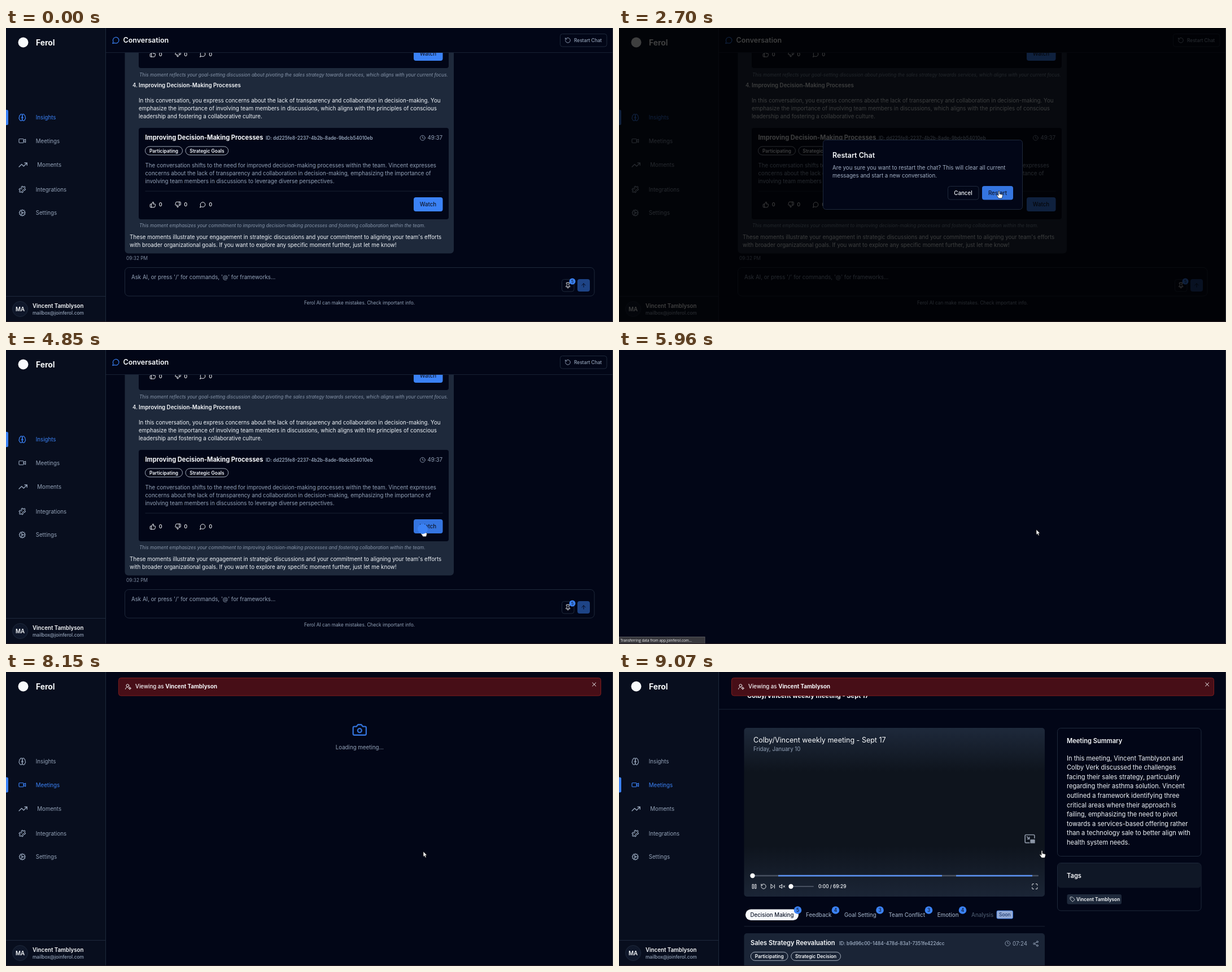
An HTML page for the animation above (9.1 s loop, 1075 by 521 pixels).

```html
<!DOCTYPE html>
<html lang="en">
<head>
<meta charset="utf-8">
<title>Conversation</title>
<style>
html, body { margin: 0; width: 100%; height: 100%; overflow: hidden; background: #020617; }
svg { display: block; width: 100vw; height: 100vh; font-family: Inter, Roboto, sans-serif; }
text { white-space: pre; }
</style>
</head>
<body>
<svg id="stage" viewBox="0 0 1075 521"></svg>
<script>
const BG = '#020617', LINE = '#1e293b', MUTED = '#94a3b8', WHITE = '#f8fafc', BLUE = '#3b82f6', BLUE_HOVER = '#3575e0', INK = '#0f172a';
const XS = 8.3, SM = 9.72, MD = 11.1, LG = 12.5;
const APP = 'Ferol', USER = 'Vincent Tamblyson', MAIL = 'mailbox@joinferol.com';
const MEETING = 'Colby/Vincent weekly meeting - Sept 17';

const circle = (x, y, r) => `<circle cx="${x}" cy="${y}" r="${r}"/>`;
const path = d => `<path d="${d}"/>`;
const ICONS = {
  chat: path('M7.9 20A9 9 0 1 0 4 16.1L2 22Z'),
  restart: path('M3 12a9 9 0 1 0 9-9 9.75 9.75 0 0 0-6.74 2.74L3 8M3 3v5h5'),
  brain: path('M12 5a3 3 0 1 0-5.997.125 4 4 0 0 0-2.526 5.77 4 4 0 0 0 .556 6.588A4 4 0 1 0 12 18Z') +
    path('M12 5a3 3 0 1 1 5.997.125 4 4 0 0 1 2.526 5.77 4 4 0 0 1-.556 6.588A4 4 0 1 1 12 18Z') +
    path('M15 13a4.5 4.5 0 0 1-3-4 4.5 4.5 0 0 1-3 4'),
  video: '<rect x="2" y="6" width="14" height="12" rx="2"/>' + path('M16 13.5l6 3.3V7.2l-6 3.3'),
  trend: path('M22 7 13.5 15.5 8.5 10.5 2 17M16 7h6v6'),
  puzzle: '<path transform="rotate(45 12 12)" d="M5 5h5a2.6 2.6 0 1 1 4 0h5v5a2.6 2.6 0 1 0 0 4v5h-5a2.6 2.6 0 1 1-4 0H5v-5a2.6 2.6 0 1 0 0-4Z"/>',
  cog: circle(12, 12, 8) + circle(12, 12, 2) +
    path('M12 2v2M12 22v-2M17 20.66l-1-1.73M11 10.27 7 3.34M20.66 17l-1.73-1M3.34 7l1.73 1M14 12h8M2 12h2M20.66 7l-1.73 1M3.34 17l1.73-1M17 3.34l-1 1.73M11 13.73l-4 6.93'),
  up: path('M7 10v12M15 5.88 14 10h5.83a2 2 0 0 1 1.92 2.56l-2.33 8A2 2 0 0 1 17.5 22H4a2 2 0 0 1-2-2v-8a2 2 0 0 1 2-2h2.76a2 2 0 0 0 1.79-1.11L12 2a3.13 3.13 0 0 1 3 3.88Z'),
  clock: circle(12, 12, 10) + path('M12 6v6l4 2'),
  pin: path('M12 17v5M9 10.76a2 2 0 0 1-1.11 1.79l-1.78.9A2 2 0 0 0 5 15.24V16a1 1 0 0 0 1 1h12a1 1 0 0 0 1-1v-.76a2 2 0 0 0-1.11-1.79l-1.78-.9A2 2 0 0 1 15 10.76V7a1 1 0 0 1 1-1 2 2 0 0 0 0-4H8a2 2 0 0 0 0 4 1 1 0 0 1 1 1z'),
  arrow: path('M5 12l7-7 7 7M12 19V5'),
  camera: path('M14.5 4h-5L7 7H4a2 2 0 0 0-2 2v9a2 2 0 0 0 2 2h16a2 2 0 0 0 2-2V9a2 2 0 0 0-2-2h-3l-2.5-3z') + circle(12, 13, 3),
  user: circle(10, 8, 5) + circle(18, 18, 3) + path('M2 21a8 8 0 0 1 10.4-7.6M18 13.5v1.5M18 21v1.5M13.5 18H15M21 18h1.5'),
  close: path('M18 6 6 18M6 6l12 12'),
  skip: path('M5 4l10 8-10 8V4zM19 5v14'),
  pause: path('M5 4h4v16H5zM15 4h4v16h-4z'),
  mute: path('M11 5 6 9H2v6h4l5 4V5zM22 9l-6 6M16 9l6 6'),
  full: path('M8 3H5a2 2 0 0 0-2 2v3M21 8V5a2 2 0 0 0-2-2h-3M3 16v3a2 2 0 0 0 2 2h3M16 21h3a2 2 0 0 0 2-2v-3'),
  share: circle(18, 5, 3) + circle(6, 12, 3) + circle(18, 19, 3) + path('M8.6 13.5l6.8 4M15.4 6.5l-6.8 4'),
  tag: path('M12.6 2.6A2 2 0 0 0 11.2 2H4a2 2 0 0 0-2 2v7.2a2 2 0 0 0 .6 1.4l8.7 8.7a2.4 2.4 0 0 0 3.4 0l6.6-6.6a2.4 2.4 0 0 0 0-3.4zM7.5 7.5h.01'),
  pip: path('M22 10V5a2 2 0 0 0-2-2H4a2 2 0 0 0-2 2v13a2 2 0 0 0 2 2h7M6 7l5 5M11 8v4H7') +
    '<rect x="14" y="14" width="8" height="6" fill="currentColor"/>'
};

const text = (x, y, size, fill, str, weight = 400, extra = '') =>
  `<text x="${x}" y="${y}" font-size="${size}" fill="${fill}" font-weight="${weight}" ${extra}>${str}</text>`;
const mid = (x, y, size, fill, str, weight) => text(x, y, size, fill, str, weight, 'text-anchor="middle"');
const lines = (x, y, step, size, fill, list) => list.map((s, i) => text(x, y + i * step, size, fill, s)).join('');
// Box given by its left, top, right and bottom edges.
const box = (l, t, r, b, fill, rx = 0, stroke = 'none', extra = '') =>
  `<rect x="${l}" y="${t}" width="${r - l}" height="${b - t}" rx="${rx}" fill="${fill}" stroke="${stroke}" ${extra}/>`;
const dot = (x, y, r, fill) => `<circle cx="${x}" cy="${y}" r="${r}" fill="${fill}"/>`;
const icon = (name, cx, cy, size, color, turn = 0, width = 2) =>
  `<g transform="translate(${cx} ${cy}) rotate(${turn}) scale(${size / 24}) translate(-12 -12)" fill="none" stroke="${color}" color="${color}" stroke-width="${width}" stroke-linecap="round" stroke-linejoin="round">${ICONS[name]}</g>`;
const group = (id, body) => `<g id="${id}">${body}</g>`;
const pill = (l, r, y, str) =>
  box(l, y, r, y + 15, 'none', 7.5, '#cbd5e1', 'stroke-width=".8"') + mid((l + r) / 2, y + 10.6, XS, WHITE, str, 600);

function sidebar(active) {
  const nav = [['Insights', 'brain', 158.5], ['Meetings', 'video', 200], ['Moments', 'trend', 242.5], ['Integrations', 'puzzle', 286], ['Settings', 'cog', 327.5]];
  return box(0, 0, 177, 520, '#080e1e') + box(176, 0, 177, 520, LINE) + box(0, 475, 176, 476, LINE) +
    dot(30.5, 25.5, 9, WHITE) + text(53, 30.5, 13.9, WHITE, APP, 700) +
    nav.map(([label, name, y]) => {
      const on = label === active, wide = name === 'trend', color = on ? BLUE : MUTED;
      return (on ? box(-3, y - 13.5, 4, y + 13.5, BLUE, 2.5) : '') +
        icon(name, wide ? 30.2 : 28.8, y, wide ? 17 : 14, color) +
        text(wide ? 55.3 : 52.7, y + 3.6, SM, color, label);
    }).join('') +
    `<circle cx="25" cy="498" r="13.5" fill="${INK}" stroke="${LINE}"/>` + mid(25, 501.5, SM, WHITE, 'MA', 600) +
    text(47, 495.6, SM, WHITE, USER, 600) + text(47, 508, XS, MUTED, MAIL, 500);
}

const reactions = y => [['up', 260, 0], ['up', 304.5, 180], ['chat', 348.5, 0]].map(([name, x, turn]) =>
  icon(name, x, y, 11.5, WHITE, turn) + text(x + 10.7, y + 3.4, 9.2, WHITE, '0', 500)).join('');
const watch = (y, id) => `<g id="${id}">${box(722, y, 773.5, y + 25, BLUE, 4)}</g>` + mid(747.5, y + 16, SM, INK, 'Watch', 500);
const note = (y, str) => text(236, y, XS, MUTED, str, 400, 'font-style="italic" opacity=".9"');

const chat = box(177, 0, 1075, 521, BG) +
  box(210.5, 30, 793, 399.5, LINE, 6) + box(235, 20, 784, 71, BG, 4) +
  reactions(46.3) + watch(33, 'watchTop') +
  note(86, 'This moment reflects your goal-setting discussion about pivoting the sales strategy towards services, which aligns with your current focus.') +
  text(224, 104.5, SM, WHITE, '4.', 500) + text(235, 104.5, SM, WHITE, 'Improving Decision-Making Processes', 600) +
  lines(235, 132, 13.9, SM, '#f1f5f9', [
    'In this conversation, you express concerns about the lack of transparency and collaboration in decision-making. You',
    'emphasize the importance of involving team members in discussions, which aligns with the principles of conscious',
    'leadership and fostering a collaborative culture.']) +
  box(235, 177, 784, 339, BG, 4) +
  text(246.5, 198, MD, WHITE, 'Improving Decision-Making Processes', 700) +
  text(460, 197.7, XS, MUTED, 'ID: dd225fe8-2237-4b2b-8ade-9bdcb54010eb', 600) +
  icon('clock', 737.8, 194.8, 10.5, MUTED) + text(746.5, 198.4, SM, MUTED, '49:37') +
  pill(246.5, 312.5, 210, 'Participating') + pill(318, 393.7, 210, 'Strategic Goals') +
  lines(246.5, 247, 13.9, SM, MUTED, [
    'The conversation shifts to the need for improved decision-making processes within the team. Vincent expresses',
    'concerns about the lack of transparency and collaboration in decision-making, emphasizing the importance of',
    'involving team members in discussions to leverage diverse perspectives.']) +
  box(246.5, 288.7, 773.5, 289.5, LINE) + reactions(313) + watch(300, 'watchBtn') +
  note(353, 'This moment emphasizes your commitment to improving decision-making processes and fostering collaboration within the team.') +
  lines(219, 374.3, 13.9, SM, '#f1f5f9', [
    "These moments illustrate your engagement in strategic discussions and your commitment to aligning your team's efforts",
    'with broader organizational goals. If you want to explore any specific moment further, just let me know!']) +
  text(213, 411, XS, MUTED, '09:32 PM', 400, 'opacity=".85"') +
  box(210.5, 424.5, 1042, 475, BG, 7, LINE) +
  text(222, 445, SM, MUTED, "Ask AI, or press '/' for commands, '@' for frameworks...") +
  box(984.5, 445.5, 1006, 467, BG, 4, LINE) + icon('pin', 995.2, 456.3, 12, WHITE) +
  dot(1003, 449, 5.5, BLUE) + mid(1003, 451.6, 7, INK, '5', 500) +
  box(1012, 445, 1034, 467, '#1e4486', 4) + icon('arrow', 1023, 456, 11, BG) +
  mid(626, 490, XS, MUTED, APP + ' AI can make mistakes. Check important info.') +
  box(177, 0, 1075, 44, BG) + box(177, 43.2, 1075, 44, LINE) +
  icon('chat', 194.7, 21.7, 14, BLUE) + text(207.5, 26.2, LG, WHITE, 'Conversation', 600) +
  box(981.5, 10.5, 1064, 33, BG, 4, LINE) + icon('restart', 995, 21.8, 11.5, MUTED) +
  `<g id="restartText" fill="${MUTED}"><text x="1006" y="24.8" font-size="${XS}" font-weight="500">Restart Chat</text></g>` +
  sidebar('Insights');

const dialog = box(361.5, 198.5, 714.5, 321.5, BG, 5, LINE) +
  text(378, 230, LG, WHITE, 'Restart Chat', 600) +
  lines(378, 251, 14, SM, '#a3b0c4', [
    'Are you sure you want to restart the chat? This will clear all current',
    'messages and start a new conversation.']) +
  group('cancelBtn', box(582.5, 280.5, 637, 304, BG, 4, LINE)) + mid(609.5, 295.6, SM, WHITE, 'Cancel', 500) +
  group('okBtn', box(643, 280, 698, 304.5, BLUE, 4)) + mid(670.5, 295.6, SM, INK, 'Restart', 500);

const loading = group('camera', icon('camera', 626.3, 102.5, 27.8, BLUE)) + mid(626.3, 137.2, SM, MUTED, 'Loading meeting...');

const badge = (x, n) => dot(x, 422, 6.8, BLUE) + mid(x, 425, 8.3, INK, n, 500);
const tabs = [[331, 'Feedback'], [399, 'Goal Setting'], [477.5, 'Team Conflict'], [563.7, 'Emotion']];
const counts = [[316.5, 5], [383.5, 4], [462, 3], [548.5, 3], [608.5, 4]];

const meeting = box(177, 0, 1075, 521, BG) + text(227, 45.6, MD, WHITE, MEETING, 700) + box(177, 65.7, 1075, 66.5, LINE) +
  box(221.5, 99, 754, 398, 'url(#shade)', 5) +
  text(238, 124.5, LG, WHITE, MEETING) + text(238, 140, SM, MUTED, 'Friday, January 10') +
  icon('pip', 727.5, 296, 20, '#8b95a5') +
  box(236, 359.8, 743, 362.3, '#475060', 1) + box(282, 359.8, 572, 362.3, '#5b93f5') + box(597, 359.8, 732, 362.3, '#5b93f5') +
  dot(236.5, 361, 4.2, '#fff') +
  icon('pause', 239.7, 380, 11, WHITE) + icon('restart', 256, 380, 11, WHITE) + icon('skip', 272.3, 380, 11, WHITE) + icon('mute', 289, 380, 11.5, WHITE) +
  box(304, 379, 345, 381, '#475060', 1) + dot(304.5, 380, 4.2, '#fff') +
  text(353, 383, XS, WHITE, '0:00 / 69:29', 500) + icon('full', 736.3, 380, 12, WHITE) +
  box(224, 420.5, 318, 440, WHITE, 9.7) + mid(271, 433.7, SM, INK, 'Decision Making', 500) +
  tabs.map(([x, s]) => text(x, 433.7, SM, MUTED, s, 500)).join('') + counts.map(([x, n]) => badge(x, n)).join('') +
  text(624, 433.7, SM, '#475569', 'Analysis', 500) +
  box(669, 423, 697.5, 437, '#94aad4', 2, BLUE, 'stroke-width=".8"') + mid(683.3, 433, XS, '#1e3a70', 'Soon', 500) +
  box(221.5, 450.4, 754, 451.2, LINE) +
  box(221.5, 463, 754, 530, '#1a2436', 5) +
  text(233, 483.7, MD, WHITE, 'Sales Strategy Reevaluation', 600) +
  text(390, 483.5, XS, MUTED, 'ID: b9d96c00-1484-478d-83a1-7351fe422dcc', 600) +
  icon('clock', 688.3, 481, 10.5, MUTED) + text(697, 484.6, SM, MUTED, '07:24') + icon('share', 738, 481.5, 11.5, MUTED) +
  pill(233.3, 299, 496.3, 'Participating') + pill(304.8, 392.5, 496.3, 'Strategic Decision') +
  box(776.5, 99.5, 1031, 326.5, BG, 6, LINE) + text(793, 126, MD, WHITE, 'Meeting Summary', 600) +
  lines(793, 156.5, 16.6, MD, '#f1f5f9', [
    'In this meeting, ' + USER + ' and', 'Colby Verk discussed the challenges', 'facing their sales strategy, particularly',
    'regarding their asthma solution. Vincent', 'outlined a framework identifying three', 'critical areas where their approach is',
    'failing, emphasizing the need to pivot', 'towards a services-based offering rather', 'than a technology sale to better align with',
    'health system needs.']) +
  box(776.5, 338.5, 1031, 423, BG, 6, LINE) + box(777, 339, 1030.5, 382.5, '#0f1726', 5) +
  text(793, 365, MD, WHITE, 'Tags', 600) +
  box(793.5, 394, 890, 411.5, LINE, 3) + icon('tag', 803, 402.8, 9.5, WHITE) + text(810, 406, XS, WHITE, USER, 600);

const banner = box(199.5, 10.5, 1053.5, 42, '#470e17', 4, '#7f1d1d') + icon('user', 216.3, 26, 11.5, WHITE) +
  icon('close', 1041.6, 22, 12, WHITE) +
  group('bannerText', text(229, 29.2, SM, WHITE, `Viewing as <tspan font-weight="700">${USER}</tspan>`, 500));

const status = box(-1, 508.5, 152, 521, '#38383d', 0, '#56565c') +
  text(2.5, 516.8, 6.4, '#f4f4f6', 'Transferring data from app.joinferol.com...', 400, 'font-family="Open Sans, Noto Sans, sans-serif"');

const outline = 'fill="#fff" stroke="#111" stroke-width=".7" stroke-linejoin="round"';
const stage = document.getElementById('stage');
stage.innerHTML =
  `<defs><linearGradient id="shade" x2="0" y2="1"><stop stop-color="#1e293b"/><stop offset=".26" stop-color="#0e141d"/><stop offset=".7" stop-color="#0e141d"/><stop offset="1" stop-color="#1b2536"/></linearGradient></defs>` +
  box(0, 0, 1075, 521, BG) + group('chat', chat) +
  group('veil', box(0, 0, 1075, 521, '#000')) + group('dialog', dialog) +
  group('blank', box(0, 0, 1075, 521, '#1c1b22')) +
  group('loading', loading) + group('meeting', meeting) + group('side', sidebar('Meetings')) +
  group('banner', banner) + group('status', status) +
  box(1074, 0, 1075, 521, '#34353d') + box(0, 520, 1075, 521, '#2c1f24') +
  group('cursor', `<path id="arrow" ${outline} d="M0 0V9.4L2.1 7.5 3.6 11 5.3 10.3 3.8 6.9H6.6Z"/>` +
    `<path id="hand" ${outline} d="M-1 1c0-1.4 2-1.4 2 0v4l4.2 1c.8.2 1.3.8 1.2 1.6L5.9 10.5 5 12.8H-.6C-1.5 11-3.5 9-4 7.6c-.2-1 1-1.3 1.8-.5L-1 8.2z"/>`) +
  `<circle id="click" r="9" fill="${BLUE}"/>`;

const $ = {};
stage.querySelectorAll('[id]').forEach(e => $[e.id] = e);

const LOOP = 9100;
// start, end, from, bend, to
const MOVES = [
  [100, 740, 1078, 230, 1050, 60, 990, 18],
  [1300, 2700, 990, 18, 958, 114, 673, 289],
  [3080, 3420, 673, 289, 645, 296, 610, 296],
  [4110, 4680, 610, 296, 670, 300, 739, 318],
  [8990, 9065, 739, 318, 744, 318, 749, 316.5]
];
const HAND = [[650, 1420], [2520, 4130], [4520, 4960], [8990, LOOP]];
const CLICKS = [[1120, 990, 20], [3540, 608, 295], [4850, 738, 317]];

const clamp = v => Math.max(0, Math.min(1, v));
const smooth = v => v * v * (3 - 2 * v);
const ramp = (t, a, b) => smooth(clamp((t - a) / (b - a)));
const within = (t, a, b) => t >= a && t < b;
const show = (id, on) => $[id].style.display = on ? '' : 'none';
const fill = (id, color) => $[id].firstChild.setAttribute('fill', color);

function pointer(t) {
  let m = MOVES[0];
  for (const next of MOVES) if (t >= next[0]) m = next;
  const [a, b, x0, y0, cx, cy, x1, y1] = m, s = ramp(t, a, b), r = 1 - s;
  return [r * r * x0 + 2 * r * s * cx + s * s * x1, r * r * y0 + 2 * r * s * cy + s * s * y1];
}

function render(t) {
  show('chat', t < 4960);
  show('blank', within(t, 4960, 5910));
  show('status', within(t, 5940, 6860));
  show('side', t >= 6500);
  show('loading', within(t, 6500, 8300));
  show('meeting', t >= 8300);

  const open = t < 2700 ? ramp(t, 1140, 1340) : 1 - ramp(t, 3570, 3770), k = .95 + .05 * open;
  show('veil', open > 0);
  show('dialog', open > 0);
  $.veil.setAttribute('opacity', .75 * open);
  $.dialog.setAttribute('opacity', open);
  $.dialog.setAttribute('transform', `translate(538 260) scale(${k}) translate(-538 -260)`);

  $.restartText.setAttribute('fill', within(t, 650, 1400) ? WHITE : MUTED);
  fill('okBtn', within(t, 2520, 3250) ? BLUE_HOVER : BLUE);
  fill('cancelBtn', within(t, 3260, 3800) ? LINE : BG);
  fill('watchBtn', within(t, 4520, 4960) ? BLUE_HOVER : BLUE);

  const p = ((within(t, 7860, 8040) ? 7860 : t) - 6500) / 2000 % 1;
  $.camera.setAttribute('opacity', 1 - .5 * smooth(1 - Math.abs(2 * p - 1)));

  show('banner', t >= 7500);
  $.banner.setAttribute('transform', `translate(0 ${-44 * (1 - ramp(t, 7500, 7700))})`);
  show('bannerText', t >= 7790);

  const [x, y] = pointer(t), hand = HAND.some(([a, b]) => within(t, a, b));
  show('cursor', t >= 100);
  $.cursor.setAttribute('transform', `translate(${x} ${y})`);
  show('hand', hand);
  show('arrow', !hand);

  const hit = CLICKS.find(([a]) => within(t, a, a + 110));
  show('click', hit);
  if (hit) $.click.setAttribute('transform', `translate(${hit[1]} ${hit[2]})`);
}

const start = performance.now();
function tick() {
  render((performance.now() - start) % LOOP);
  requestAnimationFrame(tick);
}
tick();
</script>
</body>
</html>
```
